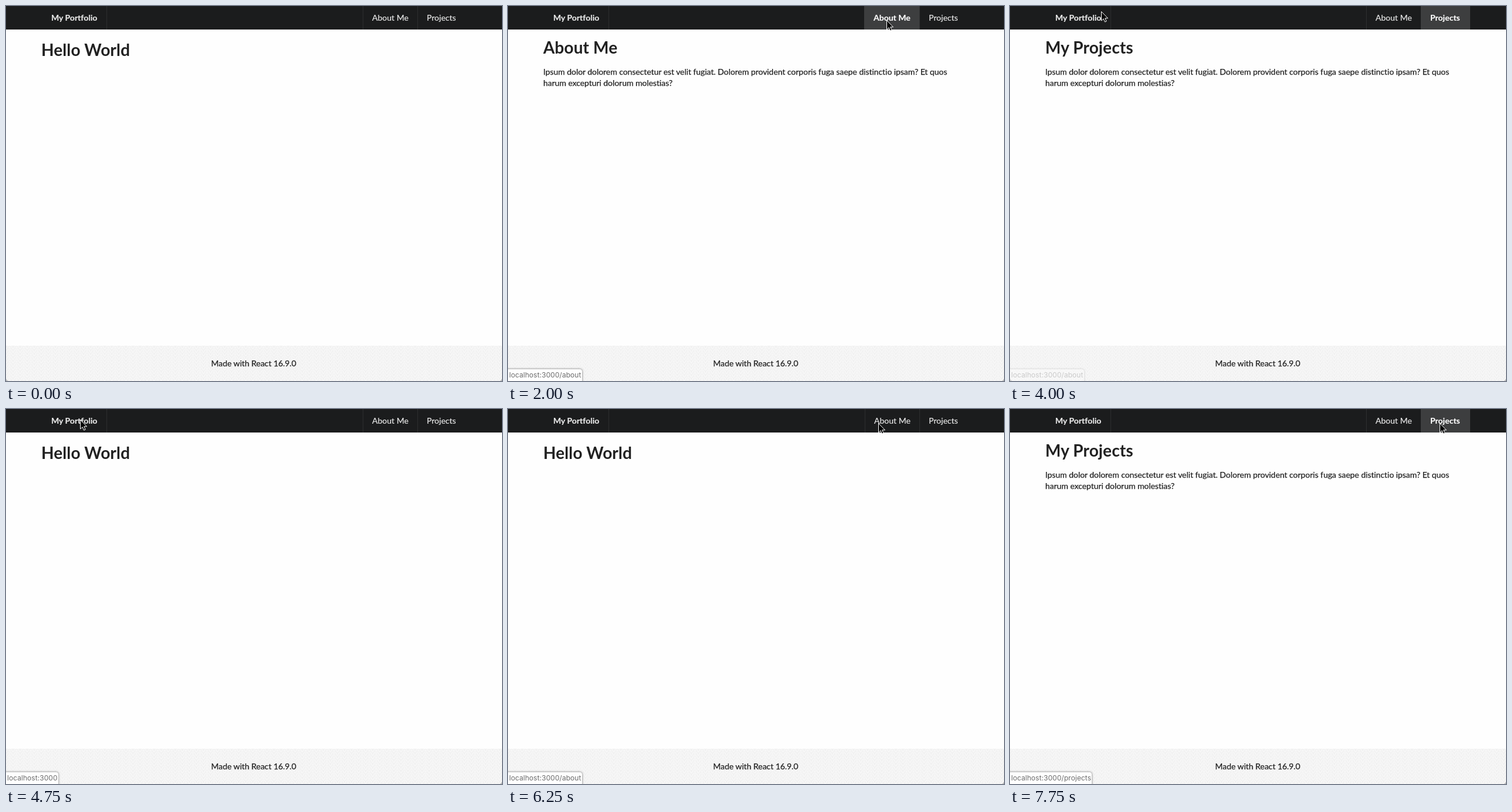
Recreate the animation shown at these times as an HTML page. Size 844x638 px, loop 8 s.

```html
<!DOCTYPE html>
<html lang="en">
<head>
<meta charset="utf-8">
<title>My Portfolio</title>
<style>
  html, body { margin: 0; width: 100%; height: 100%; overflow: hidden; background: #fefefe; }
  svg { display: block; font: 14px Lato, sans-serif; font-variant-ligatures: none; fill: #212121; }
  .nav { fill: #e8e8e8; stroke: #e8e8e8; stroke-width: .2px; }
  .bold { font-weight: 700; }
  .active { fill: #fff; font-weight: 700; }
  .body { letter-spacing: -.06px; stroke: #212121; stroke-width: .25px; }
  #title { font-size: 28px; font-weight: 700; letter-spacing: .1px; }
  #url { font: 12px Inter, sans-serif; letter-spacing: .05px; fill: #6c6c6c; }
  #bubble { filter: drop-shadow(0 0 1.5px #0005); }
</style>
</head>
<body>
<svg width="844" height="638" viewBox="0 0 844 638">
  <defs>
    <pattern id="waves" width="12" height="6" patternUnits="userSpaceOnUse">
      <rect width="12" height="6" fill="#f7f7f7"/>
      <path d="M0 6A6 6 0 0 1 12 6M3 6A3 3 0 0 1 9 6M0 3A3 3 0 0 0 3 0M12 3A3 3 0 0 1 9 0" fill="none" stroke="#f0f0f0"/>
    </pattern>
  </defs>

  <rect width="844" height="40" fill="#1b1c1d"/>
  <g fill="#2d2e2f">
    <rect x="171" width="1" height="40"/>
    <rect id="line1" width="1" height="40"/>
    <rect id="line2" width="1" height="40"/>
  </g>
  <rect id="highlight" height="40" fill="#3d3e3f"/>
  <g class="nav">
    <text class="bold" x="77" y="25">My Portfolio</text>
    <text id="about" y="25">About Me</text>
    <text id="projects" y="25">Projects</text>
  </g>

  <text id="title" x="60"></text>
  <g id="copy" class="body">
    <text x="60" y="117">Ipsum dolor dolorem consectetur est velit fugiat. Dolorem provident corporis fuga saepe distinctio ipsam? Et quos</text>
    <text x="60" y="136">harum excepturi dolorum molestias?</text>
  </g>

  <rect y="578" width="844" height="60" fill="url(#waves)"/>
  <path d="M844 634V638H840Q843 637 844 634ZM0 634V638H4Q1 637 0 634Z" fill="#b8b8b8"/>
  <text class="body" x="421.5" y="613" text-anchor="middle">Made with React 16.9.0</text>

  <g id="status">
    <path id="bubble" fill="#fff" stroke="#c0c0c0"/>
    <text id="url" x="2" y="632"></text>
  </g>

  <path id="cursor" d="M.5 -.5V15L4.1 11.7L6.5 17.1L9.1 16L6.7 10.8H11.5Z" fill="#000" stroke="#fff" stroke-linejoin="round"/>
</svg>
<script>
const LOOP = 8000;
const el = id => document.getElementById(id);
const set = (id, attrs) => {
  for (const key in attrs) el(id).setAttribute(key, attrs[key]);
};

const pages = {
  home: { title: 'Hello World', y: 85, about: 623, projects: 716 },
  about: { title: 'About Me', y: 81, about: 622, projects: 716, tab: [606, 94] },
  projects: { title: 'My Projects', y: 81, about: 622, projects: 715, tab: [699, 84] }
};

const links = {
  home: { url: 'localhost:3000', width: 90 },
  about: { url: 'localhost:3000/about', width: 127 },
  projects: { url: 'localhost:3000/projects', width: 140 }
};

// time, cursor x, cursor y, page, hovered link, status opacity
const steps = [
  [0, -40, 0, 'home'],
  [500, 838, 330, 'home'],
  [750, 790, 190, 'home'],
  [1000, 715, 85, 'home'],
  [1250, 660, 42, 'home'],
  [1500, 644, 25, 'home', 'about'],
  [2000, 644, 25, 'about', 'about'],
  [2500, 662, 25, 'about', 'about'],
  [2750, 712, 28, 'about', 'projects'],
  [3000, 744, 30, 'about', 'projects'],
  [3250, 748, 30, 'projects', 'projects'],
  [3500, 746, 29, 'projects', 'projects'],
  [3750, 640, 20, 'projects', 'about'],
  [4000, 155, 10, 'projects', 'about', 0.3],
  [4250, 130, 16, 'projects', 'home'],
  [4500, 126, 18, 'home', 'home'],
  [4750, 126, 19, 'home', 'home'],
  [5750, 367, 20, 'home', 'home'],
  [6000, 560, 24, 'home', 'home', 0.3],
  [6250, 630, 25, 'home', 'about'],
  [6500, 641, 23, 'home', 'about'],
  [6750, 641, 23, 'about', 'about'],
  [7000, 660, 23, 'about', 'about'],
  [7250, 710, 25, 'about', 'projects'],
  [7500, 731, 25, 'about', 'projects'],
  [7750, 731, 25, 'projects', 'projects']
];

function draw([, x, y, name, link, opacity = 1]) {
  const page = pages[name];
  const [tabX, tabWidth] = page.tab || [0, 0];
  set('highlight', { x: tabX, width: tabWidth });
  set('line1', { x: page.about - 16 });
  set('line2', { x: page.projects - 16 });
  for (const item of ['about', 'projects']) {
    set(item, { x: page[item], class: item === name ? 'active' : '' });
  }

  set('title', { y: page.y });
  el('title').textContent = page.title;
  set('copy', { visibility: name === 'home' ? 'hidden' : 'visible' });

  set('status', { opacity: link ? opacity : 0 });
  if (link) {
    const { url, width } = links[link];
    el('url').textContent = url;
    set('bubble', { d: `M-1 617.5H${width - 4.5}q4 0 4 4V639H-1Z` });
  }
  set('cursor', { transform: `translate(${x} ${y})` });
}

const start = performance.now();
let shown;
function tick() {
  const time = (performance.now() - start) % LOOP;
  const step = steps.findLast(s => s[0] <= time);
  if (step !== shown) draw(shown = step);
  requestAnimationFrame(tick);
}
tick();
</script>
</body>
</html>
```
